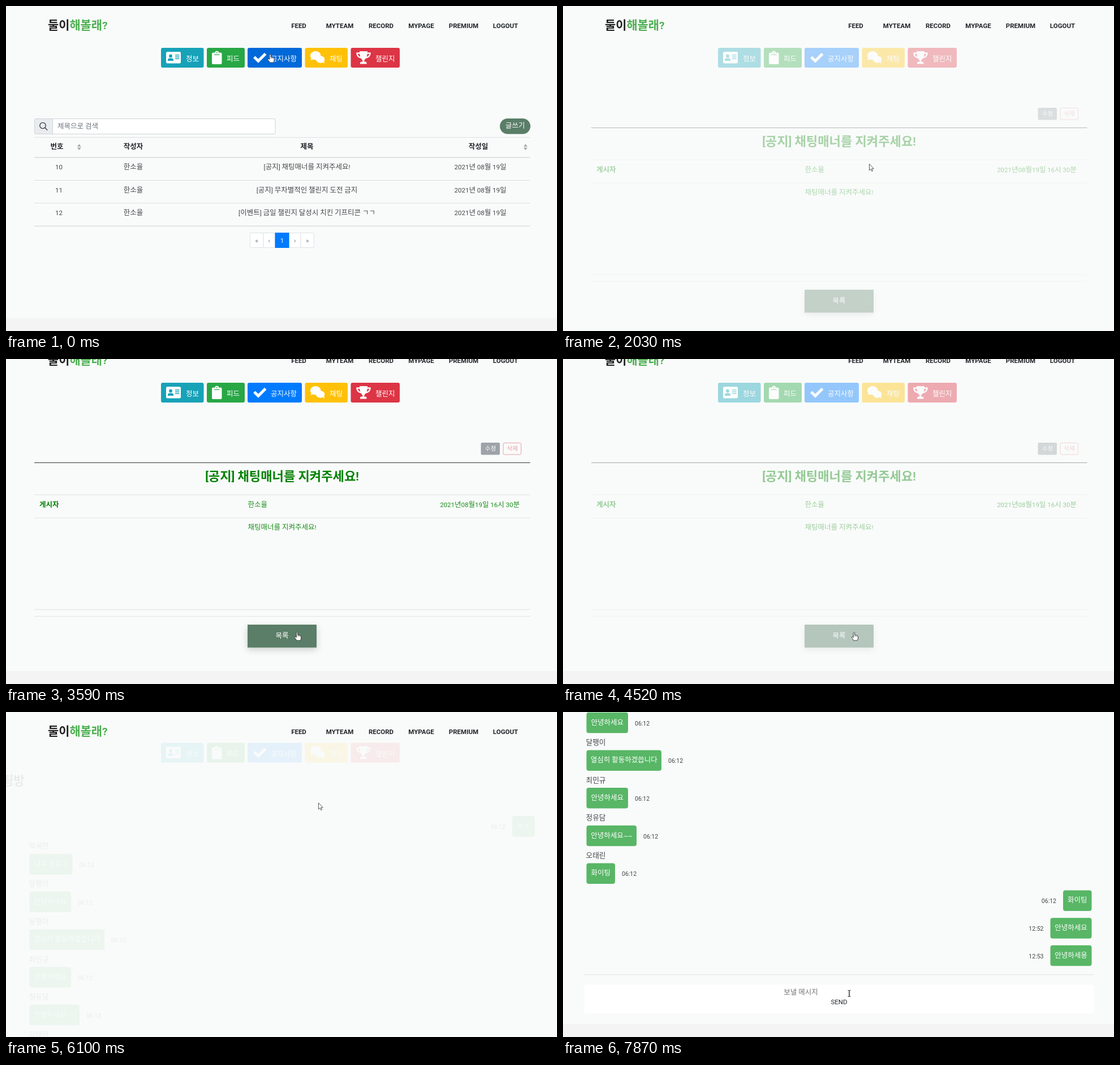
These frames come from a looping animation (974x575 px, 8 s). An HTML page:

```html
<!DOCTYPE html>
<html lang="ko">
<head>
<meta charset="utf-8">
<style>
  html, body { margin: 0; width: 100%; height: 100%; overflow: hidden; background: #f9fbfa; }
  svg { display: block; font-family: Roboto, 'Noto Sans CJK KR', 'Noto Sans CJK', sans-serif; }
  .ko { font-family: 'Noto Sans CJK KR', 'Noto Sans CJK', sans-serif; font-size: 1.087em; }
</style>
</head>
<body>
<svg id="stage" width="974" height="575" viewBox="0 0 974 575"></svg>
<script>
const GREEN = '#5a7e67', LINE = '#dee2e6', INK = '#212529', SOFT = '#43474b', LEFT = 50, RIGHT = 926.5;

const rect = (x, y, w, h, fill, r = 0, more = '') =>
  `<rect x="${x}" y="${y}" width="${w}" height="${h}" rx="${r}" fill="${fill}" ${more}/>`;
const path = (d, fill, more = '') => `<path d="${d}" fill="${fill}" ${more}/>`;
const rule = (y, color = LINE, h = 1, x = LEFT, end = RIGHT) => rect(x, y, end - x, h, color);
const spans = s => s.replace(/[ㄱ-ㅎ가-힣]+/g, '<tspan class="ko">$&</tspan>');

// y is the vertical middle of the text
function text(x, y, s, { size = 11.5, fill = INK, weight = 400, anchor = 'middle' } = {}) {
  return `<text x="${x}" y="${y + size * 0.38}" font-size="${size}" fill="${fill}" ` +
    `font-weight="${weight}" text-anchor="${anchor}">${spans(s)}</text>`;
}

const icons = {
  card: c => rect(283, 81, 26, 20.5, '#fff', 2.5) + `<circle cx="291" cy="88.5" r="2.9" fill="${c}"/>` +
    path('M286 97v-1.5q0-3 3-3h4q3 0 3 3V97z', c) +
    [86, 89.2, 92.4].map(y => rect(299, y, 7.5, 1.5, c)).join(''),
  clip: c => rect(364, 82.5, 17.5, 20.5, '#fff', 2) + '<circle cx="372.7" cy="82.8" r="3.4" fill="#fff"/>' +
    `<circle cx="372.7" cy="82.6" r="1" fill="${c}"/>` + rect(368, 85.5, 9.5, 1.3, c, .6),
  check: () => path('M438.8 90.3l7.2 7L458.7 84.6', 'none', 'stroke="#fff" stroke-width="5"'),
  chat: c => path('M556.5 88a9.2 7.6 0 1 0-16.6 4.2q-.7 2-2 3.4 3.4 0 5.6-1.6a9.2 7.6 0 0 0 13-6z', '#fff') +
    path('M563.8 94.5a8.2 6.8 0 1 0-4 5.8q2 1.6 4.6 1.5-1.4-1.5-1.9-3.4a8 8 0 0 0 1.3-3.9z', '#fff', `stroke="${c}"`) +
    path('M556 88a9 7.6 0 1 0-10 7.3q6 .3 8.5-4z', '#fff'),
  trophy: () => path('M625 80h14q0 11-4.5 14.5q-1.5 1-1.5 4h2q2.5 0 2.5 2v2h-11.5v-2q0-2 2.5-2h2q0-3-1.5-4Q625 91 625 80z', '#fff') +
    path('M625.5 83.5h-5q0 6.5 7.5 8M638.5 83.5h5q0 6.5-7.5 8', 'none', 'stroke="#fff" stroke-width="2.4"')
};

const tabs = [
  [274, 75.5, '#17a2b8', '#138496', '정보', 318, 'card'],
  [355, 67, '#28a745', '#218838', '피드', 390, 'clip'],
  [427, 96, '#007bff', '#0069d9', '공지사항', 468, 'check'],
  [528.5, 75.5, '#ffc107', '#e0a800', '채팅', 572, 'chat'],
  [609.5, 86.5, '#dc3545', '#c82333', '챌린지', 653, 'trophy']
];
const tabBar = () => tabs.map(([x, w, color, , label, tx, icon]) =>
  rect(x, 74, w, 35, color, 3, 'class="tab"') + icons[icon](color) +
  text(tx, 94, label, { fill: '#fff', anchor: 'start' })).join('');

function header() {
  const nav = { FEED: 517.5, MYTEAM: 590, RECORD: 663, MYPAGE: 734, PREMIUM: 809, LOGOUT: 883 };
  const logo = (x, s, fill) => text(x, 34, s, { size: 19.2, weight: 700, fill, anchor: 'start' });
  return logo(74, '둘이', '#212121') + logo(112.4, '해볼래?', '#4caf50') +
    Object.entries(nav).map(([s, x]) => text(x, 35, s, { weight: 600 })).join('');
}

function listPage() {
  const border = 'stroke="#ced4da"', bold = { weight: 700 }, soft = { fill: SOFT }, grey = '#6c757d';
  const sort = x => path(`M${x - 3.5} 248.8h7l-3.5-4.5zM${x - 3.5} 250.4h7l-3.5 4.5z`, '#a5a8aa');
  const titles = ['[공지] 채팅매너를 지켜주세요!', '[공지] 무차별적인 챌린지 도전 금지',
    '[이벤트] 금일 챌린지 달성시 치킨 기프티콘 ㄱㄱ'];
  const rows = titles.map((s, i) => {
    const y = 285 + i * 40.3;
    return rect(LEFT, y - 17, RIGHT - LEFT, 40.3, 'rgba(0,0,0,.075)', 0, 'class="row" opacity="0"') +
      text(93.5, y, String(10 + i), soft) + text(225, y, '한소율', soft) + text(532, y, s, soft) +
      text(838.5, y, '2021년 08월 19일', soft) + rule(y + 23, '#d9dde0', i === 2 ? 1.5 : 1);
  }).join('');
  const cells = [['«', 431.5, 23.5], ['‹', 455, 20.5], ['›', 500.5, 20.5], ['»', 521, 23.5]];
  return tabBar() + rect(50.5, 199.5, 425.5, 27, '#fff', 3, border) +
    path('M82.5 199.5H53q-2.5 0-2.5 2.5v22q0 2.5 2.5 2.5h29.5z', '#e9ecef', border) +
    path('M69 215.5l4.2 4.2M70.2 211.5a5.2 5.2 0 1 0-10.4 0a5.2 5.2 0 1 0 10.4 0', 'none', 'stroke="#343a40" stroke-width="1.3"') +
    text(91, 212.5, '제목으로 검색', { fill: grey, anchor: 'start' }) +
    rect(873, 199, 54, 27.5, GREEN, 13.7) + text(900, 212, '글쓰기', { fill: '#fff' }) +
    rule(232) + text(90, 249, '번호', bold) + text(225, 249, '작성자', bold) +
    text(532, 249, '제목', bold) + text(835, 249, '작성일', bold) + sort(129.3) + sort(918.3) +
    rule(267, '#d9dde0', 1.6) + rows +
    cells.map(([s, x, w]) => rect(x, 401.5, w, 26, '#fff', 1, `stroke="${LINE}"`) +
      text(x + w / 2, 414.5, s, { fill: grey })).join('') +
    rect(475.5, 401, 25, 27, '#007bff') + text(488, 414.5, '1', { fill: '#fff' });
}

function detailPage() {
  const fill = '#008000', soft = '#1a8c1a', red = '#e5707b', size = 9.8;
  return tabBar() + '<g opacity=".65">' + rect(839.5, 180, 33.5, 21.5, '#6c757d', 2) +
    text(856.5, 190, '수정', { size, fill: '#fff' }) +
    rect(879, 180.5, 31.5, 20.5, 'none', 2, `stroke="${red}"`) +
    text(895, 190, '삭제', { size, fill: red }) + '</g>' +
    rule(215, '#333') + text(488, 239, '[공지] 채팅매너를 지켜주세요!', { size: 20.4, weight: 600, fill }) +
    [271.7, 312.7, 474.7, 486.7].map(y => rule(y)).join('') +
    text(59, 289.5, '게시자', { weight: 700, fill, anchor: 'start' }) +
    text(427.5, 289.5, '한소율', { fill: soft, anchor: 'start' }) +
    text(908, 289.5, '2021년08월19일 16시 30분', { fill: soft, anchor: 'end' }) +
    text(488, 329.5, '채팅매너를 지켜주세요!', { fill: soft }) +
    rect(427, 502, 122, 40.5, GREEN, 0, 'id="back" style="filter:drop-shadow(0 4px 6px rgba(0,0,0,.18))"') +
    text(488, 521.5, '목록', { fill: '#fff' });
}

function chatPage() {
  const received = [['박세찬', '너무 반갑고', 76], ['달팽이', '안녕하세요', 73.5], ['달팽이', '열심히 활동하겠씁니다', 132.5],
    ['최민규', '안녕하세요', 73.5], ['정유담', '안녕하세요~~', 88.5], ['오태린', '화이팅', 50.5]];
  const sent = [[184, 'ㅎㅎ', 39.5, '06:12'], [632.5, '화이팅', 50.5, '06:12'],
    [681.2, '안녕하세요', 73, '12:52'], [729.8, '안녕하세용', 73, '12:53']];
  const bubble = (x, y, w, s) => rect(x, y, w, 36.5, '#58b666', 4) + text(x + w / 2, y + 17.5, s, { fill: '#fff' });
  const time = (x, y, s, anchor) => text(x, y + 19, s, { size: 10.5, fill: '#444', anchor });
  const hr = y => rule(y, 'rgba(0,0,0,.1)', 1, 38, 938);
  return `<g transform="translate(0 -19.5)">${tabBar()}</g>` +
    `<g id="title">${text(38, 122, '채팅방', { size: 19.5, weight: 700, fill: '#333', anchor: 'start' })}</g>` + hr(168) +
    received.map(([name, s, w], i) => {
      const y = 251 + i * 66.7;
      return text(40.5, y - 14, name, { size: 11.7, fill: SOFT, anchor: 'start' }) + bubble(41.5, y, w, s) +
        time(53.5 + w, y, '06:12', 'start');
    }).join('') +
    sent.map(([y, s, w, at]) => bubble(934.5 - w, y, w, s) + time(922.5 - w, y, at, 'end')).join('') +
    hr(781.3) + rect(38, 799.5, 900, 50.5, '#fff') +
    text(420.5, 813, '보낼 메시지', { fill: '#757575' }) + text(488, 830, 'SEND');
}

const cursors = {
  arrow: path('M0 0V11.3l2.6-2.4 1.8 4 1.7-.8-1.7-3.8h3.4z', '#fff', 'stroke="#444" stroke-width=".9"'),
  hand: path('M-1.2 1.2q1.2-1.6 2.4 0V5.5q1.3-.8 2 .4 1.3-.6 2 .5 1.7-.2 1.8 1.3V11q0 2-1.3 4H-.8q-1-2.3-3-4.5-1-1.3 0-2 1.2-.5 2.6 1.2z', '#fff', 'stroke="#333" stroke-width=".9"') +
    path('M1.2 5.5v3M3.2 6v2.5M5.2 6.5v2', 'none', 'stroke="#555" stroke-width=".6"'),
  beam: path('M-2.5-5.5h2q.5 0 .5.6V5q0 .5.5.5h2M2.5-5.5h-2q-.5 0-.5.6V5q0 .5-.5.5h-2', 'none', 'stroke="#333"')
};

const group = (id, body) => `<g id="${id}">${body}</g>`;
document.getElementById('stage').innerHTML = rect(0, 0, 974, 575, '#f9fbfa') +
  group('scroller', rect(0, 0, 974, 700, '#f4f4f4', 0, 'id="footer"') + group('header', header()) +
    group('list', listPage()) + group('detail', detailPage()) + group('chat', chatPage())) +
  group('cursor', Object.entries(cursors).map(([k, v]) => group(k, v)).join(''));
const el = id => document.getElementById(id);
const tabEls = document.querySelectorAll('#list .tab'), rowEls = document.querySelectorAll('.row');

// page, fade-in start and end, fade-out start and end
const visits = [['list', -2, -1, 1190, 1690], ['detail', 1855, 2385, 4320, 4660],
  ['list', 4720, 5250, 5580, 6040], ['chat', 6058, 6588, 9000, 9001]];
const footerTop = { list: 552, detail: 584, chat: 869 };

// time, x, y
const track = [[140, 467, 85], [420, 478, 112], [740, 520, 225], [960, 543, 278], [1030, 541.5, 279.5],
  [3100, 541.5, 279.5], [3240, 556, 330], [3380, 559, 420], [3480, 530, 486], [3540, 510, 490], [3590, 514.5, 483],
  [4850, 514.5, 483], [5000, 522, 440], [5150, 535, 385], [5350, 558, 160], [5520, 563, 86],
  [5880, 563, 86], [6100, 552.5, 160.5], [6300, 530, 215], [6450, 520.5, 233],
  [7000, 520.5, 233], [7130, 524, 300], [7270, 512, 440], [7410, 502, 505], [7610, 502, 505], [7870, 506, 498]];

const part = (t, a, b) => Math.min(1, Math.max(0, (t - a) / (b - a)));
const smooth = p => p * p * (3 - 2 * p);

function pointer(t) {
  const i = track.findIndex(p => p[0] > t);
  if (i < 1) return track[i ? track.length - 1 : 0].slice(1);
  const [t0, x0, y0] = track[i - 1], [t1, x1, y1] = track[i], p = part(t, t0, t1);
  return [x0 + (x1 - x0) * p, y0 + (y1 - y0) * p];
}

function draw(now) {
  const t = now % 8000;
  const [page, in0, in1, out0, out1] = visits.find(v => t < v[4]);
  const opacity = part(t, in0, in1) * (1 - part(t, out0, out1));
  for (const id in footerTop) {
    el(id).setAttribute('opacity', id === page ? opacity : 0);
    el(id).style.display = id === page ? '' : 'none';
  }

  const scroll = page === 'detail' ? 32 * (1 - (1 - part(t, 2720, 2920)) ** 3)
    : page === 'chat' ? 317 * smooth(part(t, 6540, 6790)) : 0;
  el('scroller').setAttribute('transform', `translate(0 ${-Math.round(scroll)})`);
  el('footer').setAttribute('y', footerTop[page]);
  el('title').setAttribute('transform', `translate(${-80 * (1 - part(t, 6058, 6458)) ** 2} 0)`);
  el('back').setAttribute('fill', t >= 4250 ? '#557862' : GREEN);

  const [x, y] = pointer(t), onList = page === 'list' && opacity > 0;
  let kind = 'arrow';
  tabs.forEach(([left, w, color, hover], i) => {
    const over = onList && x > left && x < left + w && y > 74 && y < 109;
    tabEls[i].setAttribute('fill', over ? hover : color);
    if (over) kind = 'hand';
  });
  rowEls.forEach((row, i) => {
    const over = onList && y > 268 + i * 40.3 && y < 308.3 + i * 40.3;
    row.setAttribute('opacity', over ? 1 : 0);
    if (over) kind = 'hand';
  });
  if (page === 'detail' && x < 549 && y > 471) kind = 'hand';
  if (page === 'chat' && y > 488) kind = y < 504 ? 'beam' : 'hand';
  for (const k in cursors) el(k).style.display = k === kind ? '' : 'none';
  el('cursor').setAttribute('transform', `translate(${x} ${y})`);
}

const start = performance.now();
function tick() {
  draw(performance.now() - start);
  requestAnimationFrame(tick);
}
tick();
</script>
</body>
</html>
```
